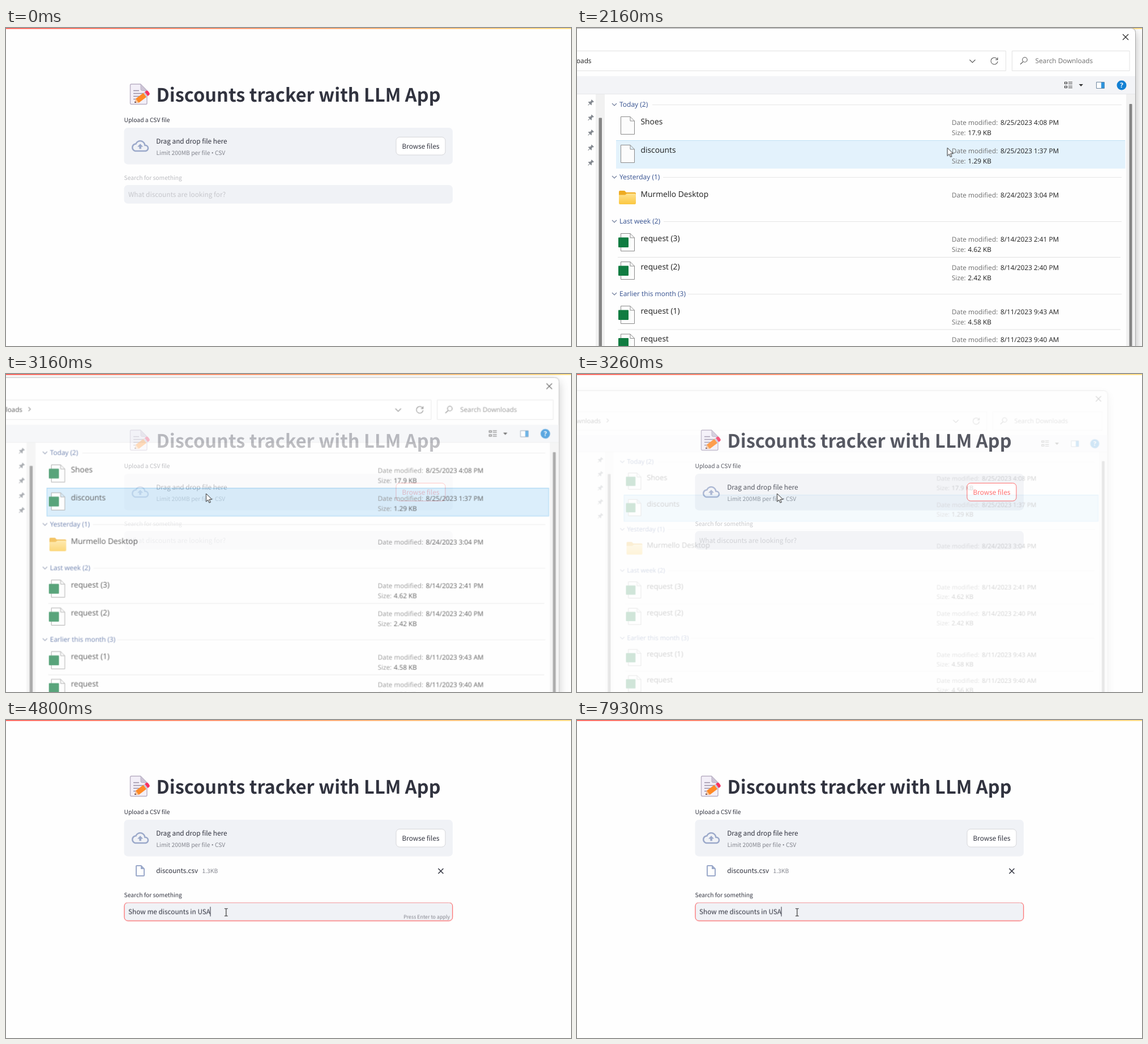
Animation of 998x561 px, one loop 8 s. Source, as an HTML page:

```html
<!DOCTYPE html>
<html lang="en">
<head>
<meta charset="utf-8">
<title>Discounts tracker</title>
<style>
  html, body { margin: 0; width: 100%; height: 100%; overflow: hidden; background: #fefefe; }
  svg { display: block; width: 998px; height: 561px; }
  text { text-rendering: geometricPrecision; white-space: pre; }
  #page { font-family: "Noto Sans CJK SC", "Noto Sans CJK JP", "Noto Sans CJK", "Open Sans", sans-serif; font-size: 11.8px; fill: #31333f; }
  #page .small { font-size: 10.32px; }
  #page .muted { fill: #83858e; }
  #page .bullet { font-family: "Open Sans", sans-serif; }
  #heading { font-size: 32.55px; font-weight: 700; }
  #dialog { font-family: "Open Sans", "Noto Sans", sans-serif; font-size: 11.8px; fill: #1d1d1d;
    transform-origin: 269px 421px; filter: drop-shadow(0 6px 9px rgba(0,0,0,.28)); }
  #dialog .name { font-size: 13.85px; }
  #dialog .group { font-size: 12px; fill: #34508f; }
  #dialog .gray { fill: #6f6f6f; }
  .line { fill: none; stroke: #5a5a5a; stroke-width: 1.1; }
</style>
</head>
<body>
<svg viewBox="0 0 998 561" xmlns="http://www.w3.org/2000/svg">
  <defs>
    <linearGradient id="barFill"><stop stop-color="#ff5a52"/><stop offset="1" stop-color="#ffdc78"/></linearGradient>
    <linearGradient id="folderFill" x2="0" y2="1"><stop stop-color="#ffe28f"/><stop offset="1" stop-color="#fbc740"/></linearGradient>
    <path id="sheet" d="M77.5 8.5H94l7.5 7.5V39.5h-24zM94 8.5V16h7.5" fill="#fcfcfc" stroke="#8b8b8b"/>
    <g id="folder">
      <path d="M74 13q0-2 2-2h8l3 3h15q2 0 2 2v8H74z" fill="#eeab22"/>
      <path d="M74 18.5h11l3-2.5h14q2 0 2 2v15q0 2-2 2H76q-2 0-2-2z" fill="url(#folderFill)"/>
    </g>
    <path id="pin" transform="rotate(45)" fill="#858a91" d="M-2.8-5.5h5.6v1.2l-1 .8v2.5l2 2v1.2h-3.3v4h-1v-4h-3.3v-1.2l2-2v-2.5l-1-.8z"/>
  </defs>
  <rect width="998" height="561" fill="#fefefe"/>
  <rect width="998" height="1.7" fill="url(#barFill)"/>

  <g id="page">
    <g id="memo">
      <path d="M221.5 99H237.5L249 110.5V132.5q0 2-2 2H221.5q-2 0-2-2V101q0-2 2-2z" fill="#f3eff8" stroke="#b9b0c4" stroke-width="1.4"/>
      <path d="M238 99V108q0 2.5 2.5 2.5H249z" fill="#cdc4d6" stroke="#b9b0c4"/>
      <path d="M225 110.5h10M225 115.5h19M225 120.5h17M225 125.5h9" stroke="#998ea4" stroke-width="1.4"/>
      <g transform="translate(227 132) rotate(-37)">
        <path d="M0 0L6-4.5V4.5z" fill="#f6c39b"/>
        <path d="M0 0L2.5-1.8V1.8z" fill="#4d3a4f"/>
        <path d="M6-4.5H23V4.5H6z" fill="#ff8a26"/>
        <path d="M23-4.5h3v9h-3z" fill="#cdc4d6"/>
        <path d="M26-4.5h2.5q3 0 3 3v3q0 3-3 3H26z" fill="#f8315f"/>
      </g>
    </g>
    <text id="heading" x="265.5" y="130">Discounts tracker with LLM App</text>
    <text class="small" x="208.5" y="166.2">Upload a CSV file</text>
    <rect x="208.5" y="176" width="580.5" height="64.5" rx="6.6" fill="#f0f2f6"/>
    <path transform="translate(222 193) scale(1.26)" fill="#9ba9ca" d="M19.35 10.04A7.49 7.49 0 0 0 12 4C9.11 4 6.6 5.64 5.35 8.04A5.994 5.994 0 0 0 0 14c0 3.31 2.69 6 6 6h13c2.76 0 5-2.24 5-5 0-2.64-2.05-4.78-4.65-4.96zM19 18H6c-2.21 0-4-1.79-4-4 0-2.05 1.53-3.76 3.56-3.97l1.07-.11.5-.95A5.469 5.469 0 0 1 12 6c2.62 0 4.88 1.86 5.39 4.43l.3 1.5 1.53.11A2.98 2.98 0 0 1 22 15c0 1.65-1.35 3-3 3zM8 13h2.55v3h2.9v-3H16l-4-4z"/>
    <text x="265.2" y="203.5">Drag and drop file here</text>
    <text class="small muted" x="265.5" y="223.5">Limit 200MB per file <tspan class="bullet">•</tspan> CSV</text>
    <rect id="browseBox" x="689" y="192.5" width="87" height="31.5" rx="6.2" fill="#fff" stroke="#d6d7da"/>
    <text id="browseText" x="732.5" y="213" text-anchor="middle">Browse files</text>

    <g id="file">
      <path transform="translate(225 254)" fill="#9ba9ca" d="M14 2H6c-1.1 0-2 .9-2 2v16c0 1.1.9 2 2 2h12c1.1 0 2-.9 2-2V8zM6 20V4h7v5h5v11z"/>
      <text x="265.2" y="270">discounts.csv</text>
      <text class="small muted" x="346.5" y="270">1.3KB</text>
      <path d="M763.5 262l9 9m0-9l-9 9" stroke="#31333f" stroke-width="1.5"/>
    </g>

    <g id="search">
      <text id="searchLabel" class="small" x="208.5" y="268.2">Search for something</text>
      <rect x="208.5" y="277" width="580.5" height="32.8" rx="6.6" fill="#f0f2f6"/>
      <rect id="focusRing" x="209" y="277.5" width="579.8" height="32.2" rx="6.2" fill="none" stroke="#ff4b4b"/>
      <text id="placeholder" x="216" y="298.3">What discounts are looking for?</text>
      <text id="query" x="216" y="298.3">Show me discounts in USA</text>
      <text id="hint" class="muted" x="784" y="305.8" text-anchor="end" font-size="8.85">Press Enter to apply</text>
    </g>
    <path id="caretStart" d="M216.5 329.5v17" stroke="#31333f"/>
    <path id="caretEnd" d="M361 329.5v17" stroke="#31333f"/>
  </g>

  <g id="dialog">
    <path d="M-450 .5H978.5q8 0 8 8V700H-450z" fill="#fefefe" stroke="#a9a9a9"/>
    <path class="line" d="M964 11l10 10m0-10l-10 10" style="stroke:#222"/>
    <path d="M-450 40.5H757.5v35H-450zM768.5 40.5h207.5v35h-207.5z" fill="#fff" stroke="#e2e2e2"/>
    <text x="25.5" y="62" text-anchor="end">Downloads</text>
    <path id="crumb" class="line" d="M36.5 53.5l3.5 3.5-3.5 3.5"/>
    <path class="line" d="M693.5 56l5 5 5-5M742.5 55.5a6 6 0 1 0 .6 3.5M743 52v4h-4M788 59.5l-5 4.5"/>
    <circle class="line" cx="791" cy="56" r="4.2"/>
    <text class="gray" x="809.5" y="62">Search Downloads</text>
    <path d="M-450 85H986V116.5H-450z" fill="#f3f4f7"/>
    <path d="M-450 116.5H986" stroke="#e7e8ea"/>
    <path class="line" d="M861.5 95.5h4v3h-4zM861.5 102.5h4v3h-4zM868 95.5h7M868 98.5h7M868 102.5h7M868 105.5h7" style="stroke:#3a3a3a"/>
    <path d="M886.5 99h7.5l-3.75 4z" fill="#333"/>
    <path d="M917.5 95.5h14v11h-14z" fill="#fff" stroke="#6f87a0"/>
    <path d="M926 96h5.5v10H926z" fill="#2f94dc"/>
    <circle cx="962" cy="101" r="8.5" fill="#1380d3"/>
    <text x="962" y="105.3" text-anchor="middle" font-weight="700" style="fill:#fff">?</text>
    <path d="M33 117h16v583H33zM970 117h16v583h-16z" fill="#f1f1f1"/>
    <rect x="38.5" y="158.5" width="5.5" height="560" rx="1" fill="#858585"/>
    <rect x="975.5" y="134" width="5" height="580" rx="1" fill="#858585"/>
    <rect x="69" y="198" width="899.5" height="50" fill="#e3f2fc"/>
    <path d="M69 198.5h899" stroke="#bfe0f5"/>
    <rect id="pickedRow" x="69.5" y="198.5" width="898.5" height="49.5" fill="#cbe7fa" stroke="#8ac8f0"/>
    <g id="listing"></g>
  </g>

  <g id="pointer">
    <path d="M0 0V14.3l3.3-3.2 2.2 5.1 2.3-1-2.2-5h4.7z" fill="#fff" stroke="#222" stroke-linejoin="round"/>
    <circle id="busy" cx="10.7" cy="1" r="4.6" fill="#d5ebfa" stroke="#2488d8" stroke-width="3.8"/>
  </g>
  <path id="beam" d="M-3-6.5h2.2q.8 0 .8 1 0-1 .8-1H3M0-6V6M-3 6.5h2.2q.8 0 .8-1 0 1 .8 1H3" fill="none" stroke="#333" stroke-width="1.2"/>
</svg>

<script>
const LOOP = 8000;
const el = id => document.getElementById(id);

// steps: [ms, value, easing?]; the value holds before the first and after the last step
function play(id, prop, steps, easing = 'linear') {
  const all = [[0, steps[0][1]], ...steps.filter(s => s[0] > 0), [LOOP, steps.at(-1)[1]]];
  const frames = all.map(([ms, value, ease]) => ({ offset: ms / LOOP, [prop]: value, easing: ease || easing }));
  el(id).animate(frames, { duration: LOOP, iterations: Infinity });
}
const hold = (id, prop, steps) => play(id, prop, steps, 'steps(1)');

// visible inside each [from, to] range
function show(id, ...ranges) {
  const steps = [[0, 0]];
  for (const [from, to] of ranges) {
    steps.push([from, 1]);
    if (to < LOOP) steps.push([to, 0]);
  }
  hold(id, 'opacity', steps);
}
const move = (id, points) =>
  play(id, 'transform', points.map(([ms, x, y, ease]) => [ms, `translate(${x}px,${y}px)`, ease]));

// file list
const groups = [
  ['Today (2)', 135, 133], ['Yesterday (1)', 263, 152],
  ['Last week (2)', 341, 153], ['Earlier this month (3)', 469, 196]
];
const files = [
  [148, 'Shoes', '8/25/2023 4:08 PM', '17.9 KB', 'lateShoes'],
  [198, 'discounts', '8/25/2023 1:37 PM', '1.29 KB', 'lateDiscounts'],
  [276, 'Murmello Desktop', '8/24/2023 3:04 PM'],
  [354, 'request (3)', '8/14/2023 2:41 PM', '4.62 KB'],
  [404, 'request (2)', '8/14/2023 2:40 PM', '2.42 KB'],
  [482, 'request (1)', '8/11/2023 9:43 AM', '4.58 KB'],
  [531.5, 'request', '8/11/2023 9:40 AM', '4.56 KB']
];
const groupMarkup = ([label, y, lineX]) => `
  <path class="line" d="M62 ${y - 2}l4 4 4-4" style="stroke:#6d7a99"/>
  <text class="group" x="75" y="${y + 4}">${label}</text>
  <path d="M${lineX} ${y + .5}H962" stroke="#e6e6e6"/>`;
const fileMarkup = ([y, name, date, size, badgeId = '']) => `
  <g transform="translate(0 ${y})">
    <use href="#${size ? 'sheet' : 'folder'}"/>
    ${size ? `<rect id="${badgeId}" x="73" y="15.5" width="18" height="17.5" rx="1" fill="#107c41"/>` : ''}
    <text class="name" x="112.5" y="21.5">${name}</text>
    <text class="gray" x="662" y="22.5">Date modified:</text><text x="748" y="22.5">${date}</text>
    ${size ? `<text class="gray" x="662" y="40.5">Size:</text><text x="690.5" y="40.5">${size}</text>` : ''}
  </g>`;
const separators = [404.5, 532].map(y => `<path d="M72 ${y}H960" stroke="#e2e2e2"/>`);
const pins = [132, 158.5, 185, 211.5, 238].map(y => `<use href="#pin" transform="translate(24 ${y})"/>`);
el('listing').innerHTML = [...separators, ...pins, ...groups.map(groupMarkup), ...files.map(fileMarkup)].join('');

// dialog opens and closes
const OPEN = 1900;
play('dialog', 'opacity', [[0, 0], [OPEN, 0], [OPEN + 170, 1], [3140, 1], [3160, .7], [3300, 0]]);
play('dialog', 'transform', [
  [0, 'scale(.9)'], [OPEN, 'scale(.9)', 'ease-out'], [OPEN + 230, 'scale(1)'],
  [3130, 'scale(1)'], [3160, 'scale(.987)'], [3300, 'scale(.91)']
]);
for (const id of ['crumb', 'lateShoes', 'lateDiscounts']) show(id, [2500, LOOP]);
show('pickedRow', [2900, LOOP]);

// page states
const RED = '#ff4b4b', INK = '#31333f', EDGE = '#d6d7da';
play('browseBox', 'stroke', [[0, EDGE], [1340, EDGE], [1440, RED], [4300, RED], [4500, EDGE]]);
play('browseText', 'fill', [[0, INK], [1340, INK], [1440, RED], [4300, RED], [4500, INK]]);
const LOADED = 3500;
show('file', [LOADED, LOOP]);
hold('search', 'transform', [[0, 'translate(0px,0px)'], [LOADED, 'translate(0px,44.5px)']]);
hold('searchLabel', 'fill', [[0, '#bbbcc0'], [LOADED + 100, INK]]);
hold('placeholder', 'fill', [[0, '#c6c7cc'], [LOADED + 100, '#a7a9b0']]);
hold('placeholder', 'opacity', [[0, 1], [4800, 0]]);
play('focusRing', 'opacity', [[0, 0], [4300, 0], [4500, 1]]);
show('query', [4800, LOOP]);
show('hint', [4800, 6460]);
show('caretStart', [4300, 4800]);
show('caretEnd', [4800, 5330], [5860, 6400], [6900, 7400], [7930, LOOP]);

// mouse
move('pointer', [
  [0, 959, 318], [1100, 959, 318, 'ease-out'], [1460, 754, 213.5], [2050, 754, 213.5, 'ease-in'],
  [2200, 590, 210], [2300, 483, 208.5, 'ease-out'], [2750, 353.5, 211], [3340, 353.5, 211, 'ease-in-out'],
  [3760, 414, 295.5], [3990, 393, 320]
]);
show('pointer', [1100, 4000]);
show('busy', [1600, 2030]);
move('beam', [[0, 393, 326], [4000, 393, 326, 'ease-out'], [4130, 388.8, 339.2]]);
show('beam', [4000, LOOP]);
</script>
</body>
</html>
```
